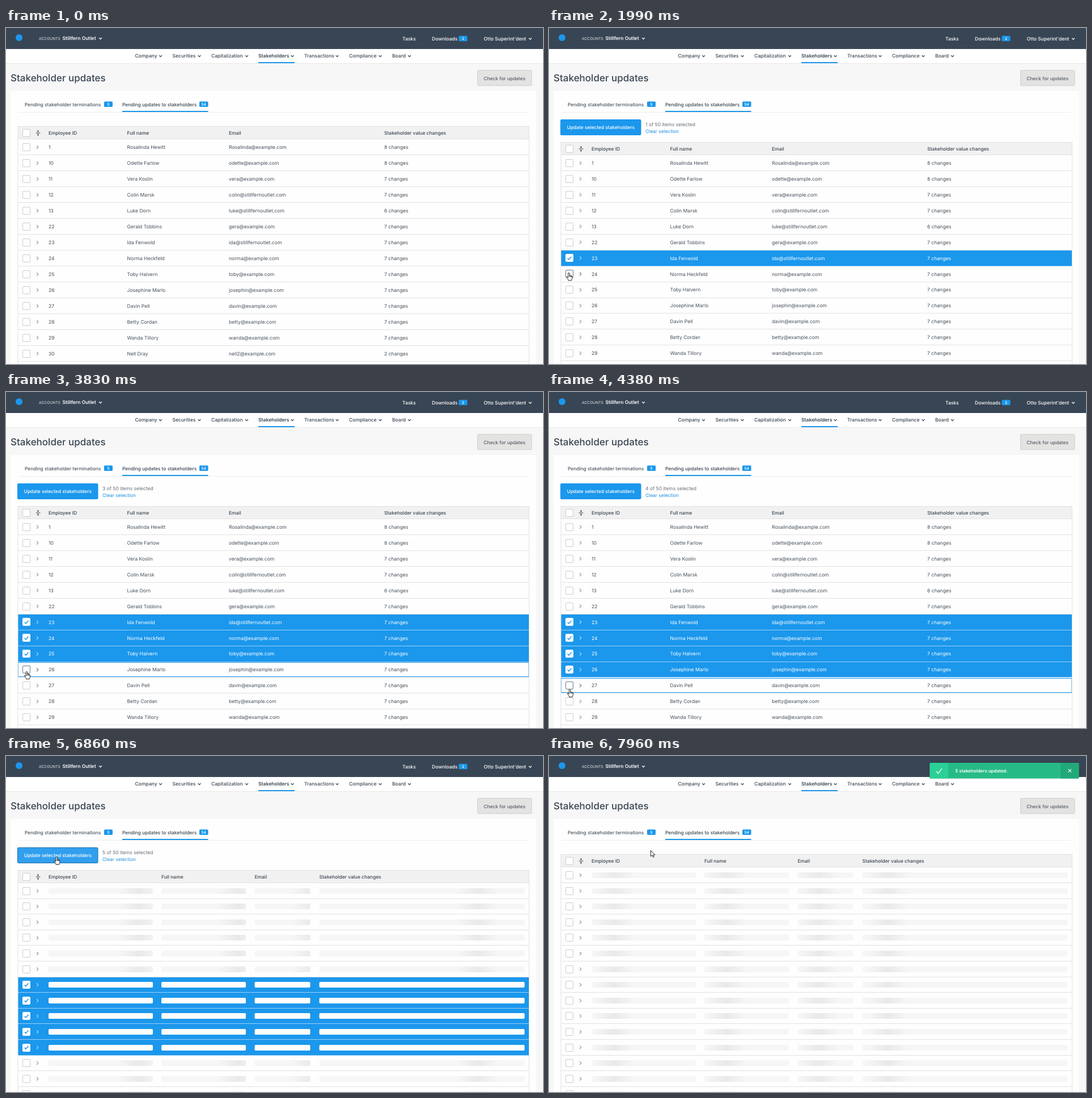
Write an HTML page with a canvas that moves like this. It is 947x592 px and loops after 7990 ms.

```html
<!DOCTYPE html>
<html lang="en">
<head>
<meta charset="utf-8">
<title>Stakeholder updates</title>
<style>
html, body { margin: 0; width: 100%; height: 100%; overflow: hidden; background: #f7f7f7; }
canvas { display: block; width: 947px; height: 592px; font-family: Inter, sans-serif; }
</style>
</head>
<body>
<canvas id="stage" width="947" height="592"></canvas>
<script>
const ctx = document.getElementById('stage').getContext('2d');
const LOOP = 7990;
const BLUE = '#1b97ec', INK = '#3a4552', BODY = '#46505b';

const DOMAINS = { e: 'example.com', o: 'stillfernoutlet.com' };
const ROWS = [
  '1|Rosalinda Hewitt|Rosalinda|e|8', '10|Odette Farlow|odette|e|8',
  '11|Vera Koslin|vera|e|7', '12|Colin Marsk|colin|o|7',
  '13|Luke Dorn|luke|o|6', '22|Gerald Tobbins|gera|e|7',
  '23|Ida Fenwold|ida|o|7', '24|Norma Heckfeld|norma|e|7',
  '25|Toby Halvern|toby|e|7', '26|Josephine Marlo|josephin|e|7',
  '27|Davin Pell|davin|e|7', '28|Betty Cordan|betty|e|7',
  '29|Wanda Tillory|wanda|e|7', '30|Nell Dray|nell2|e|2', '31||||'
].map(line => {
  const [id, name, user, domain, changes] = line.split('|');
  return name ? [id, name, user + '@' + DOMAINS[domain], changes + ' changes'] : [id, '', '', ''];
});
const HEADINGS = ['Employee ID', 'Full name', 'Email', 'Stakeholder value changes'];
const DATA_X = [75, 213.5, 393, 667];
const BARS = [[75, 184], [274, 149], [438.5, 98], [552.5, 362]];
const NAV = [
  ['Company', 227.5, 272.5], ['Securities', 293.5, 341], ['Capitalization', 362, 424.5],
  ['Stakeholders', 445, 505], ['Transactions', 526, 584], ['Compliance', 605, 660], ['Board', 681, 711.5]
];

// Timeline, in ms
const FIRST_PICKED = 6;
const CLICKS = [1060, 2240, 3310, 3760, 4380];
const COUNTED = [1430, 2500, 3640, 4130, 4660];
const BAR_IN = 1430, PRESS = 5970, LOADING = 6210, DONE = 7350;
const PATH = [
  [150, 812, 604], [850, 36, 377], [1600, 36, 377], [1960, 35, 431], [2120, 35, 431],
  [2200, 36, 432], [2640, 36, 432], [2900, 37, 467], [3050, 36.5, 464], [3450, 36.5, 464],
  [3700, 36.5, 492], [3900, 36.5, 492], [4090, 36.5, 523.5], [4880, 36.5, 523.5],
  [5660, 89, 177.5], [7450, 89, 177.5], [7950, 179.5, 166.5]
];

const clamp = v => Math.max(0, Math.min(1, v));
const ramp = (t, a, b) => clamp((t - a) / (b - a));
const smooth = v => v * v * (3 - 2 * v);
const mix = (a, b, p) => a + (b - a) * p;

function pointer(t) {
  let i = 0;
  while (i < PATH.length - 2 && t > PATH[i + 1][0]) i++;
  const [a, b] = [PATH[i], PATH[i + 1]];
  const p = smooth(ramp(t, a[0], b[0]));
  return { x: mix(a[1], b[1], p), y: mix(a[2], b[2], p) };
}

function rect(x, y, w, h, fill) {
  ctx.fillStyle = fill;
  ctx.fillRect(x, y, w, h);
}

function box(x, y, w, h, r, fill, stroke) {
  ctx.beginPath();
  ctx.roundRect(x, y, w, h, r);
  ctx.fillStyle = fill;
  ctx.fill();
  if (stroke) {
    ctx.strokeStyle = stroke;
    ctx.lineWidth = 1;
    ctx.stroke();
  }
}

function text(s, x, cy, color = INK, size = 8.5, weight = 500, align = 'left') {
  ctx.font = `${weight} ${size}px Inter, sans-serif`;
  ctx.fillStyle = color;
  ctx.textAlign = align;
  ctx.fillText(s, x, cy + size * 0.36);
}

function line(points, color, width) {
  ctx.beginPath();
  points.forEach(([x, y], i) => i ? ctx.lineTo(x, y) : ctx.moveTo(x, y));
  ctx.strokeStyle = color;
  ctx.lineWidth = width;
  ctx.stroke();
}

const caretDown = (x, y, color) => line([[x - 2.4, y - 1.2], [x, y + 1.2], [x + 2.4, y - 1.2]], color, 1.3);
const caretRight = (x, y, color) => line([[x - 1.5, y - 2.9], [x + 1.5, y], [x - 1.5, y + 2.9]], color, 1);

function badge(s, x, y, w) {
  box(x, y, w, 9.5, 1.5, BLUE);
  text(s, x + w / 2, y + 4.8, '#fff', 6.6, 600, 'center');
}

function checkbox(cy, hover, checked) {
  const y = Math.round(cy) - 6.5;
  box(29.5, y, 13, 13, 1.5, '#fff', checked ? '#fff' : hover ? '#6f7780' : '#cdcdcd');
  if (checked) line([[32.8, cy + 0.2], [35, cy + 2.5], [39.4, cy - 2.6]], BLUE, 1.5);
}

function drawPage() {
  rect(0, 0, 947, 592, '#f7f7f7');
  rect(0, 0, 947, 37, '#384554');
  ctx.beginPath();
  ctx.arc(23, 17, 6, 0, 7);
  ctx.fillStyle = BLUE;
  ctx.fill();
  text('ACCOUNTS', 58, 18.7, '#e4e7ea', 6.7, 400);
  text('Stillfern Outlet', 99.5, 18.2, '#fff', 8.5, 600);
  caretDown(166.5, 18.5, '#fff');
  text('Tasks', 699, 18.7, '#fff');
  text('Downloads', 751, 18.7, '#fff');
  badge('2', 798.5, 13.7, 15);
  text("Otto Superint'dent", 842.5, 18.7, '#fff');
  caretDown(924.5, 19, '#fff');

  rect(0, 37, 947, 25, '#fff');
  rect(0, 62, 947, 1, '#e8e8e8');
  NAV.forEach(([label, x, caretX], i) => {
    text(label, x, 49, INK, 8.55, i === 3 ? 600 : 500);
    caretDown(caretX, 49.5, INK);
  });
  rect(445, 60, 64, 2, BLUE);

  text('Stakeholder updates', 8, 87.7, INK, 17);
  box(831.5, 74.5, 95.5, 27, 1.5, '#e3e3e2', '#cfcfcf');
  text('Check for updates', 879.2, 88.5, '#555d66', 8.4, 500, 'center');

  rect(8, 111, 927, 481, '#fefefe');
  rect(21, 148, 900, 1, '#ededed');
  text('Pending stakeholder terminations', 33, 135, '#4b5560', 8.4);
  badge('5', 173, 129.4, 15);
  text('Pending updates to stakeholders', 205, 135, INK, 8.4);
  badge('54', 341, 129.4, 15.5);
  rect(205, 146, 151.5, 2, BLUE);
}

function drawActions(t, mouse) {
  const hover = mouse.x < 162 && mouse.y > 161 && mouse.y < 189;
  const pressed = t >= PRESS && t < LOADING;
  const focused = t >= PRESS;
  const fill = pressed ? '#218bd8' : hover ? '#329fee' : BLUE;
  box(20.5, 161.5, 141.5, 27, 1.5, fill, focused ? '#176fb0' : fill);
  text('Update selected stakeholders', 91.3, 175.3, '#fff', 8.4, 500, 'center');
  const count = COUNTED.filter(at => t >= at).length;
  text(count + ' of 50 items selected', 170, 169.5, '#666e76', 8.55, 400);
  text('Clear selection', 170, 182, '#1b8fe0', 8.4, 400);
}

function drawBar([x, w], cy, peak, selected) {
  let fill = '#fdfdfd';
  if (!selected) {
    fill = ctx.createLinearGradient(x + peak - 36, 0, x + peak + 36, 0);
    fill.addColorStop(0, '#f6f6f6');
    fill.addColorStop(0.5, '#e9e9e9');
    fill.addColorStop(1, '#f6f6f6');
  }
  box(x, Math.round(cy) - 5, w, 10, 2, fill);
}

function shimmerPeak(t, width) {
  if (t >= DONE) return mix(-70, 34 + width * 0.03, ramp(t, DONE, 7960));
  const p = 0.3 + 0.15 * ramp(t, LOADING, 6360) + 0.225 * ramp(t, 6700, 6860);
  return -100 + p * (width + 200);
}

function drawHeader(top, xs) {
  rect(21, top, 902, 22, '#f1f1f1');
  rect(21, top - 1, 902, 1, '#e2e2e2');
  rect(21, top + 21, 902, 1, '#e2e2e2');
  const cy = top + 11;
  checkbox(cy, false, false);
  line([[52.5, cy], [60.5, cy]], INK, 1);
  line([[56.5, cy - 5], [56.5, cy - 1.8]], INK, 1);
  line([[56.5, cy + 1.8], [56.5, cy + 5]], INK, 1);
  line([[54.8, cy - 3.6], [56.5, cy - 2], [58.2, cy - 3.6]], INK, 1);
  line([[54.8, cy + 3.6], [56.5, cy + 2], [58.2, cy + 3.6]], INK, 1);
  HEADINGS.forEach((label, i) => text(label, xs[i], cy, INK, 8.45));
}

function drawTable(t, mouse) {
  const loading = t >= LOADING;
  const shifted = t >= BAR_IN && t < DONE;
  const bodyTop = shifted ? 224 : 196.4;
  const pitch = loading ? 27.6 : 27.95;
  const xs = loading ? BARS.map(bar => bar[0]) : DATA_X;
  drawHeader(shifted ? 202 : 174, xs);

  let overBox = false;
  ROWS.forEach((cells, i) => {
    const y0 = bodyTop + i * pitch;
    const top = Math.round(y0), bottom = Math.round(y0 + pitch);
    const cy = y0 + pitch / 2 - 0.2;
    const click = t < DONE ? CLICKS[i - FIRST_PICKED] : undefined;
    const amount = click === undefined ? 0 : ramp(t, click + 90, click + 230);
    const selected = amount > 0.5;
    const inRow = mouse.y >= y0 && mouse.y < y0 + pitch && t > 180;
    const hover = inRow && Math.abs(mouse.x - 36) < 9 && Math.abs(mouse.y - cy) < 9;
    overBox = overBox || hover;

    rect(21, bottom - 1, 902, 1, '#e2e2e2');
    if (amount) {
      ctx.globalAlpha = amount;
      rect(21, top, 901.5, bottom - top - 1, BLUE);
      rect(21, bottom - 1, 901.5, 1, '#9dd0f6');
      ctx.globalAlpha = 1;
    }
    if (click !== undefined && t >= click && amount < 1) {
      ctx.strokeStyle = BLUE;
      ctx.lineWidth = 1;
      ctx.strokeRect(21.5, top + 0.5, 900.5, bottom - top - 2);
    }
    checkbox(cy, hover, selected);
    caretRight(55.5, cy, selected ? '#fff' : hover ? '#252d36' : '#5d666f');
    if (loading) BARS.forEach(bar => drawBar(bar, cy, shimmerPeak(t, bar[1]), selected));
    else cells.forEach((s, c) => text(s, xs[c], cy, selected ? '#fff' : BODY, 8.6, 400));
  });
  rect(20.5, shifted ? 201 : 173, 1, 420, '#e2e2e2');
  rect(922, shifted ? 201 : 173, 1, 420, '#e2e2e2');
  return overBox;
}

function drawToast(t) {
  const p = ramp(t, DONE + 30, DONE + 230);
  if (!p) return;
  ctx.save();
  ctx.globalAlpha = p;
  ctx.translate(0, -4 * (1 - smooth(p)));
  ctx.shadowColor = 'rgba(0,0,0,.2)';
  ctx.shadowBlur = 3;
  box(671.5, 12, 263, 27.5, 1.5, '#26bb86');
  ctx.shadowColor = 'transparent';
  box(671.5, 12, 32.5, 27.5, [1.5, 0, 0, 1.5], '#2bd096');
  box(902, 12, 32.5, 27.5, [0, 1.5, 1.5, 0], '#22a979');
  line([[683, 27], [686.3, 30.8], [692.7, 22.2]], '#fff', 1.3);
  text('5 stakeholders updated.', 716.5, 26.2, '#fff', 7.9, 600);
  line([[915.8, 23.2], [921.2, 28.6]], '#fff', 1.1);
  line([[921.2, 23.2], [915.8, 28.6]], '#fff', 1.1);
  ctx.restore();
}

const HAND = new Path2D('M-1.2 1Q0-.6 1.2 1V5L2.9 5.1 4.6 5.7 6 6.8V10L4.8 12.4V13.8H-1V12.4L-4 8.4Q-4.4 6.9-3 7.1L-1.2 8.8Z');
const FINGERS = new Path2D('M1.2 5V7.5M2.9 5.2V7.7M4.6 5.8V8');
const ARROW = new Path2D('M0 0V10.4L2.5 8.2 4.1 11.8 5.8 11 4.2 7.6H7.4Z');

function drawPointer({ x, y }, hand) {
  ctx.save();
  ctx.translate(x, y);
  ctx.fillStyle = '#fff';
  ctx.strokeStyle = '#111';
  ctx.lineWidth = 0.9;
  const shape = hand ? HAND : ARROW;
  ctx.fill(shape);
  ctx.stroke(shape);
  if (hand) ctx.stroke(FINGERS);
  ctx.restore();
}

function draw() {
  const t = performance.now() % LOOP;
  const mouse = pointer(t);
  ctx.textRendering = 'geometricPrecision';
  drawPage();
  const hasActions = t >= BAR_IN && t < DONE;
  if (hasActions) drawActions(t, mouse);
  const overBox = drawTable(t, mouse);
  const overButton = hasActions && mouse.x < 162 && mouse.y > 161 && mouse.y < 189;
  drawToast(t);
  if (t >= 180) drawPointer(mouse, overBox || overButton);
  requestAnimationFrame(draw);
}
draw();
</script>
</body>
</html>
```
